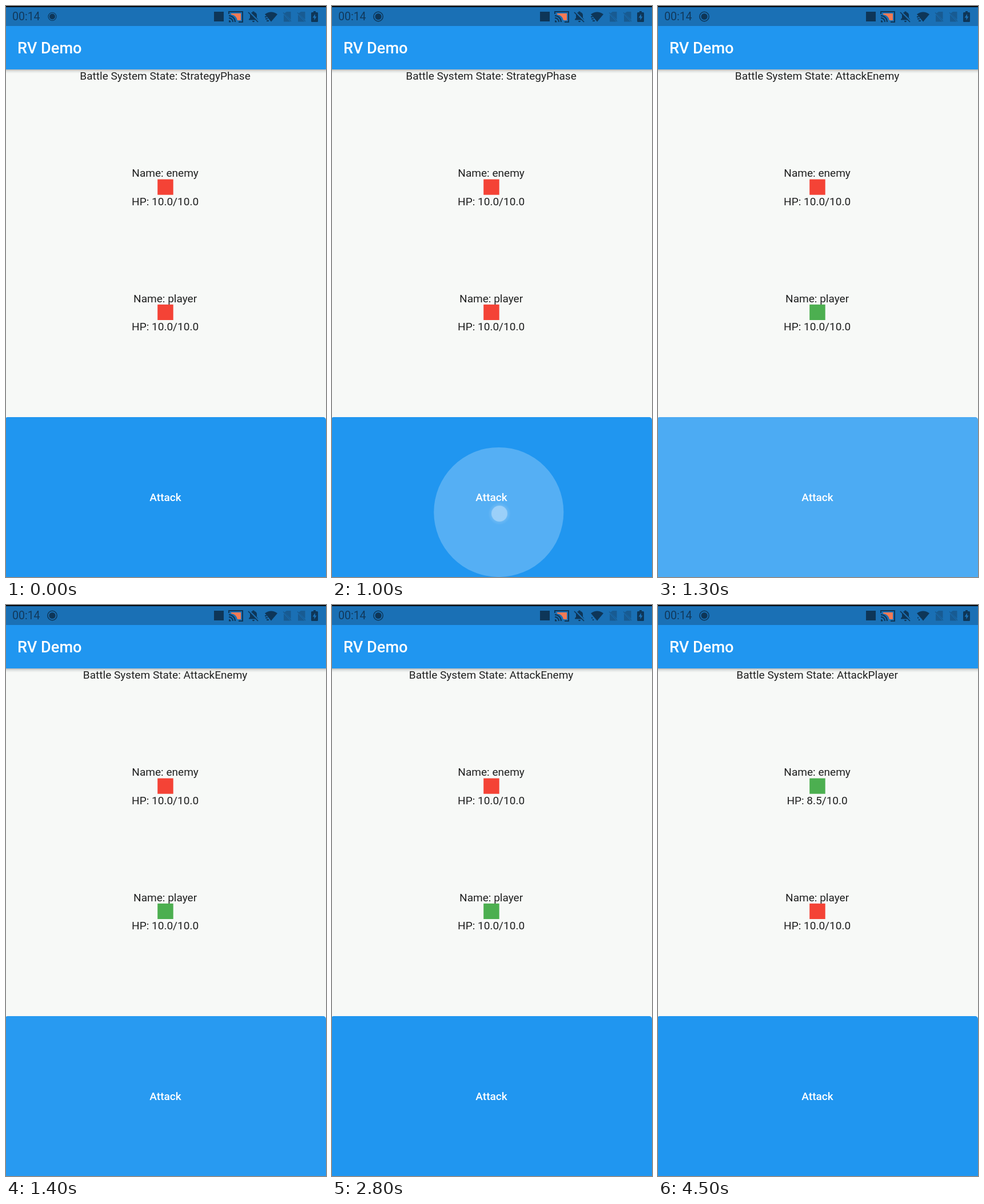
Write an HTML page that moves like this. It is 560 px wide and 1000 px high and loops after 5 s.

```html
<!DOCTYPE html>
<html lang="en">
<head>
<meta charset="utf-8">
<title>Turn-based battle</title>
<style>
  html, body { margin: 0; width: 100%; height: 100%; overflow: hidden; background: #f7f9f7; }
  svg { display: block; width: 100vw; height: 100vh; }
  text { font: 19.06px Roboto, sans-serif; fill: #1f2020; }
  .mid { text-anchor: middle; }
  .title { font-size: 27.2px; font-weight: 500; fill: #fff; }
  .button { font-weight: 500; fill: #fff; }
  .clock { font-size: 19.5px; fill: #11395c; }
</style>
</head>
<body>
<svg viewBox="0 0 560 1000">
  <defs>
    <linearGradient id="shade" x2="0" y2="1">
      <stop offset="0" stop-opacity=".27"/>
      <stop offset=".4" stop-opacity=".1"/>
      <stop offset="1" stop-opacity="0"/>
    </linearGradient>
    <radialGradient id="halo">
      <stop offset=".6" stop-color="#fff" stop-opacity=".16"/>
      <stop offset="1" stop-color="#fff" stop-opacity="0"/>
    </radialGradient>
    <clipPath id="buttonClip"><rect x="-2" y="720" width="562" height="290" rx="5"/></clipPath>
  </defs>

  <rect width="560" height="1000" fill="#f7f9f7"/>
  <rect y="111" width="560" height="7" fill="url(#shade)"/>
  <rect y="35" width="560" height="76" fill="#2096f0"/>
  <rect width="560" height="35" fill="#1a70b5"/>
  <rect width="560" height="2" fill="#04090e"/>
  <text class="title" x="20" y="83">RV Demo</text>

  <!-- status bar -->
  <text class="clock" x="11" y="25.3">00:14</text>
  <g fill="#0e3658">
    <circle id="recordRing" cx="81" cy="18.5" fill="none" stroke="#0e3658"/>
    <circle id="recordDot" cx="81" cy="18.5"/>
    <rect x="364" y="10" width="17" height="17"/>
    <path d="M394 13H411V25H405Q403 16 394 15Z" fill="#f47a55"/>
    <path d="M390 14V10H414V28H407M390 17a11 11 0 0 1 11 11M390 21a7 7 0 0 1 7 7" fill="none" stroke="#0e3658" stroke-width="2"/>
    <path d="M390 25a3.5 3.5 0 0 1 3.5 3.5H390Z"/>
    <path d="M425 24.5V23l2-2v-5q0-4 4.500-5.200V9.500h3v1.300q4.500 1.200 4.500 5.200v5l2 2v1.500ZM431 26h4q0 2.200-2 2.200t-2-2.200Z"/>
    <path d="M424.500 9.500L442 27" stroke="#1a70b5" stroke-width="3"/>
    <path d="M424 11L441 28" stroke="#0e3658" stroke-width="1.700"/>
    <path d="M453 14.500Q464 6.500 475 14.500L464 27.500Z"/>
    <path id="wifiActivity" stroke="#0e3658" stroke-width="1.800"/>
    <g id="sims" fill="#185b92"></g>
    <path d="M538 11V9h4v2h2.500q1.500 0 1.500 1.500v14q0 1.500-1.500 1.500h-9q-1.500 0-1.500-1.500v-14q0-1.500 1.500-1.500Z"/>
    <path d="M541 14l-4.500 6.500h3V25l4-6.500h-2.500Z" fill="#1a70b5"/>
  </g>

  <text id="state" class="mid" x="278.600" y="129"></text>
  <g id="fighters"></g>

  <!-- attack button -->
  <g clip-path="url(#buttonClip)">
    <rect x="-2" y="720" width="562" height="290" fill="#2096f0"/>
    <circle id="ripple" fill="#fff"/>
  </g>
  <text class="button mid" x="279" y="867.400">Attack</text>
  <g id="touch">
    <circle cx="293" cy="889" r="20" fill="url(#halo)"/>
    <circle cx="293" cy="889" r="14" fill="#fff" opacity=".3"/>
  </g>
</svg>
<script>
const LOOP = 5000, STEP = 100;
const PRESS = 905, RELEASE = 1047, COUNTER = 4000;
const RED = '#f44336', GREEN = '#4caf50';
const TOUCH = { x: 293, y: 889 }, CENTER = { x: 279, y: 860 };
const $ = id => document.getElementById(id);
const clamp = v => Math.min(1, Math.max(0, v));
const mix = (a, b, k) => a + (b - a) * k;

function set(id, attrs) {
  for (const name in attrs) $(id).setAttribute(name, attrs[name]);
}

// Cubic bezier (.25, .1, .25, 1), solved by bisection.
function ease(x) {
  const bezier = (a, b, s) => 3 * a * s * (1 - s) ** 2 + 3 * b * s * s * (1 - s) + s ** 3;
  let low = 0, high = 1;
  for (let i = 0; i < 20; i++) {
    const s = (low + high) / 2;
    if (bezier(.25, .25, s) < x) low = s; else high = s;
  }
  return bezier(.1, 1, low);
}

const fighter = (name, y) => `
  <text class="mid" x="278.600" y="${y - 4.3}">Name: ${name}</text>
  <rect id="${name}Box" x="265.200" y="${y}" width="27.500" height="27.200"/>
  <text id="${name}Hp" class="mid" x="278.600" y="${y + 45}"></text>`;

$('fighters').innerHTML = fighter('enemy', 303.5) + fighter('player', 522.8);
$('sims').innerHTML = [485, 510].map(x =>
  `<path d="M${x + 2} 13l4-3h7.500v14ZM${x + 1} 15l11.500 12.500H${x + 1}Z"/>
   <path d="M${x} 11.500l14 15.500" stroke="#185b92" stroke-width="1.300"/>`).join('');

function drawRipple(t) {
  const held = clamp((Math.min(t, RELEASE) - PRESS) / 1000);
  const grown = Math.max(0, t - RELEASE) / 225;
  const k = ease(clamp(held + grown));
  const fade = 1 - clamp((t - RELEASE - 225) / 150);
  set('ripple', {
    cx: mix(TOUCH.x, CENTER.x, k),
    cy: mix(TOUCH.y, CENTER.y, k),
    r: mix(94, 318, k),
    opacity: .24 * clamp((t - PRESS) / 75) * fade
  });
}

function draw(t) {
  const attacking = t >= RELEASE && t < COUNTER;
  const countered = t >= COUNTER;
  const phase = countered ? 'AttackPlayer' : attacking ? 'AttackEnemy' : 'StrategyPhase';
  $('state').textContent = 'Battle System State: ' + phase;
  set('enemyBox', { fill: countered ? GREEN : RED });
  set('playerBox', { fill: attacking ? GREEN : RED });
  $('enemyHp').textContent = `HP: ${countered ? '8.5' : '10.0'}/10.0`;
  $('playerHp').textContent = 'HP: 10.0/10.0';

  drawRipple(t);
  set('touch', { visibility: t > PRESS && t < 1200 ? 'visible' : 'hidden' });

  const settled = t >= 300;
  set('recordRing', { r: settled ? 8.2 : 7, 'stroke-width': settled ? 1.5 : 1.2 });
  set('recordDot', { r: settled ? 5.6 : 5 });
  set('wifiActivity', { d: t < 2800 ? 'M453 19h3M454 22.500h4M456 26h4' : 'M454 22.500h2M456 26h2' });
}

function tick(now) {
  draw(Math.floor(now % LOOP / STEP) * STEP);
  requestAnimationFrame(tick);
}
draw(0);
requestAnimationFrame(tick);
</script>
</body>
</html>
```
